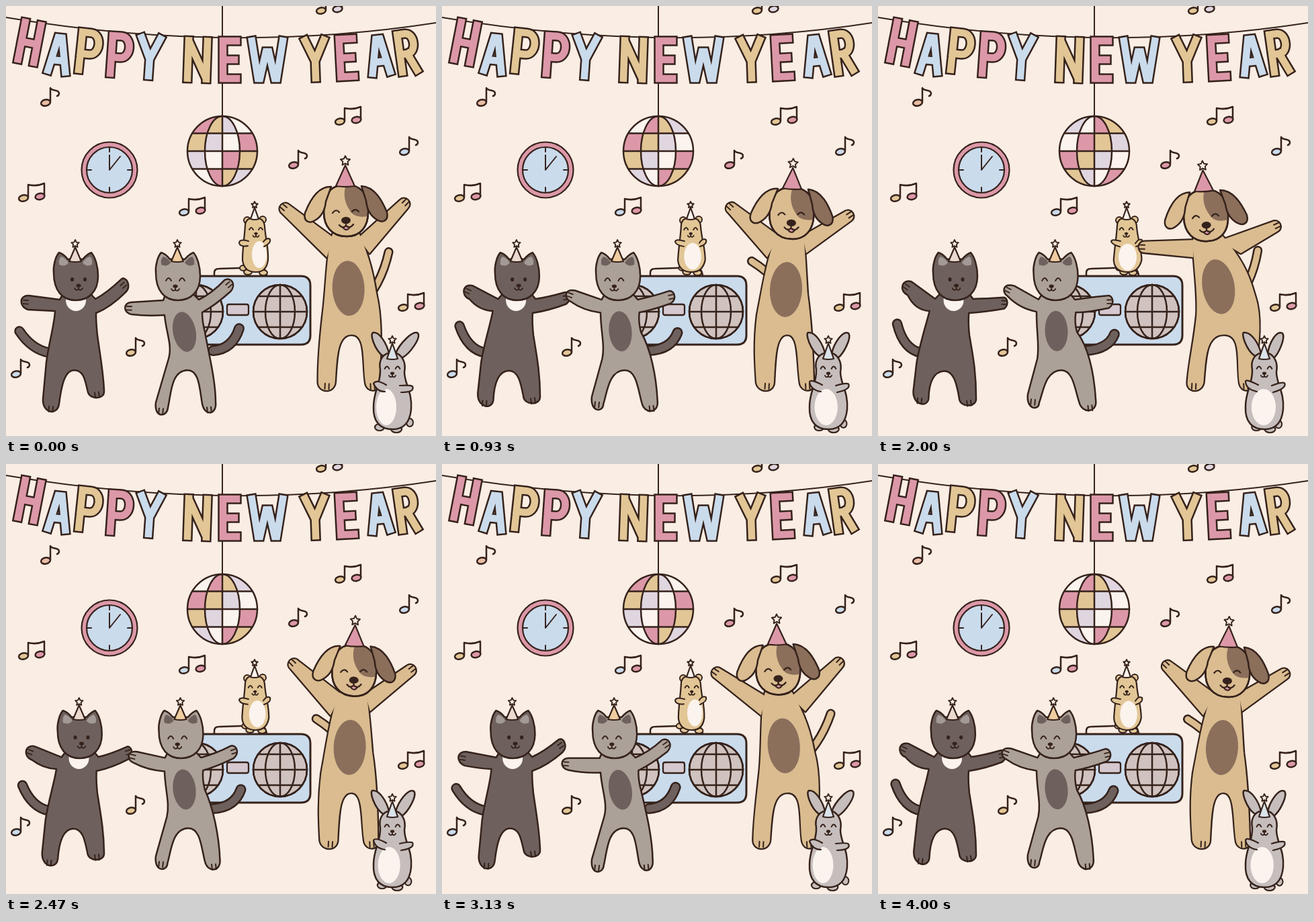
Recreate the animation shown at these times as an HTML page with a canvas. Size 640x640 px, loop 4.07 s.

```html
<!DOCTYPE html>
<html lang="en">
<head>
<meta charset="utf-8">
<title>Happy New Year</title>
<style>
html, body { margin: 0; width: 100%; height: 100%; overflow: hidden; background: #faede4; }
canvas { display: block; width: 640px; height: 640px; }
</style>
</head>
<body>
<canvas id="stage" width="640" height="640" role="img" aria-label="HAPPY NEW YEAR"></canvas>
<script>
const ctx = document.getElementById('stage').getContext('2d');
const INK = '#35221b', BG = '#faede4', PINK = '#dc98a8', BLUE = '#cadbec', TAN = '#e2c696',
  LILAC = '#dfd6e0', CREAM = '#fbf3ed', COCOA = '#6e615d', GREY = '#aca199',
  DOG = '#dabc90', PATCH = '#8b6f5b', BUNNY = '#c6bebd';
const TAU = Math.PI * 2;
let k = 0; // pose blend for every "a~b" pair

const lerp = (a, b, t = k) => a + (b - a) * t;
const mix = (d, t) => d.replace(/(-?[\d.]+)~(-?[\d.]+)/g, (_, a, b) => lerp(+a, +b, t).toFixed(2));

function shape(d, fill, width = 2.5, t = k) {
  const p = new Path2D(mix(d, t));
  if (fill) { ctx.fillStyle = fill; ctx.fill(p); }
  if (width) { ctx.lineWidth = width; ctx.strokeStyle = INK; ctx.stroke(p); }
}
function oval(x, y, rx, ry, fill, width = 2.5, turn = 0) {
  ctx.beginPath();
  ctx.ellipse(x, y, rx, ry, turn * Math.PI / 180, 0, TAU);
  if (fill) { ctx.fillStyle = fill; ctx.fill(); }
  if (width) { ctx.lineWidth = width; ctx.strokeStyle = INK; ctx.stroke(); }
}
function tube(d, fill, width, t = k) {
  const p = new Path2D(mix(d, t));
  for (const [c, w] of [[INK, width + 5], [fill, width]]) {
    ctx.strokeStyle = c; ctx.lineWidth = w; ctx.stroke(p);
  }
}
function at(x, y, turn, fn) {
  ctx.save(); ctx.translate(x, y); ctx.rotate(turn * Math.PI / 180); fn(); ctx.restore();
}
const claws = (x, y, turn, size = 1) => at(x, y, turn, () => {
  ctx.scale(size, size);
  shape('M-3 0V8M3 0V8', null, 2);
});
function hat(x, base, w, h, fill) {
  shape(`M${x} ${base - h}L${x + w} ${base}Q${x} ${base + 2} ${x - w} ${base}Z`, fill, 2.2);
  const r = w > 11 ? 7.5 : w > 7 ? 6 : 5, y = base - h - r + 1;
  let d = '';
  for (let i = 0; i < 10; i++) {
    const a = i * TAU / 10 - TAU / 4, q = i % 2 ? r * .5 : r;
    d += (i ? 'L' : 'M') + (x + q * Math.cos(a)).toFixed(2) + ' ' + (y + q * Math.sin(a)).toFixed(2);
  }
  shape(d + 'Z', BG, 1.9);
}

const glyphs = {
  H: 'M-12 -28V28M12 -28V28M-12 1H12',
  A: 'M-13 25L-3 -25H3L13 25M-8 9H8',
  P: 'M-13 28V-28H0C17 -28 17 4 0 4H-13',
  Y: 'M-14 -28L0 3L14 -28M0 3V28',
  N: 'M-14 28V-28M14 28V-28M-11 -22L11 22',
  E: 'M10 -28H-10V28H10M-10 0H7',
  W: 'M-23 -28L-14 28H-11L-2 -12H2L11 28H14L23 -28',
  R: 'M-11 28V-28H0C15 -28 15 2 0 2H-11M0 2L11 28'
};
const banner = [['H', 35, 54, 11], ['A', 78, 72, 6], ['P', 124, 68, 6], ['P', 170, 73, 4], ['Y', 214, 76, 4],
  ['N', 285, 80, 2], ['E', 333, 80, 0], ['W', 389, 80, 0],
  ['Y', 460, 79, -2], ['E', 507, 77, -3], ['A', 556, 74, -6], ['R', 597, 69, -8]];
const inks = [PINK, BLUE, TAN, PINK, BLUE, TAN, PINK, BLUE, TAN, PINK, BLUE, TAN];

function drawBanner() {
  shape('M322 0V164', null, 2);
  shape('M0 17Q330 73 640 25', null, 2);
  ctx.save();
  ctx.lineCap = 'square';
  ctx.lineJoin = 'miter';
  ctx.miterLimit = 2;
  banner.forEach(([ch, x, y, turn], i) => at(x, y, turn, () => tube(glyphs[ch], inks[i], 10.5)));
  ctx.restore();
}

const note = (x, y, fill) => at(x, y, 0, () => {
  shape('M7 -1V-22C9 -17 20 -20 20 -14Q20 -11 17 -10', null, 2.5);
  oval(0, 0, 7, 4.6, fill, 2.5, -12);
});
const pair = (x, y, left, right) => at(x, y, 0, () => {
  shape('M7 -1V-20Q19 -17 31 -22V-4', null, 2.5);
  oval(0, 0, 7, 4.6, left, 2.5, -10);
  oval(24.5, -2.5, 7, 4.6, right, 2.5, -10);
});
function drawNotes() {
  note(59, 144, '#e9bda4'); note(593, 217, BLUE); note(428, 237, PINK);
  note(186, 516, TAN); note(15, 548, BLUE);
  pair(26, 286, TAN, PINK); pair(265, 307, BLUE, PINK); pair(497, 172, TAN, PINK);
  pair(591, 449, TAN, PINK); pair(469, 7, TAN, LILAC);
}

function drawBall(shift) {
  const R = 52, rows = [-52, -26.5, 0, 26.5, 52], cols = [-52, -26, 0, 26, 52];
  const colors = [PINK, TAN, LILAC, CREAM];
  const edge = (x, y) => x * Math.sqrt(Math.max(0, 1 - y * y / R / R));
  at(322, 216, 0, () => {
    for (let r = 0; r < 4; r++) for (let c = 0; c < 4; c++) {
      ctx.beginPath();
      for (let i = 0; i < 18; i++) {
        const down = i < 9, y = lerp(rows[r], rows[r + 1], (down ? i : 17 - i) / 8);
        ctx.lineTo(edge(cols[down ? c : c + 1], y), y);
      }
      ctx.fillStyle = colors[(r + c + shift) % 4];
      ctx.fill();
    }
    globe(R, 26, 26.5);
  });
}
function globe(r, rx, lat) {
  const w = Math.sqrt(r * r - lat * lat);
  oval(0, 0, r, r); oval(0, 0, rx, r);
  shape(`M0 ${-r}V${r}M${-r} 0H${r}M${-w} ${-lat}H${w}M${-w} ${lat}H${w}`);
}

function drawClock() {
  oval(154, 244, 41.5, 41.5, PINK, 2.2);
  oval(154, 244, 34, 34, BLUE, 2.2);
  shape('M154 211V217M154 270V276M121 244H127M181 244H187M154 244V222M154 244L170 224', null, 2);
}

function drawRadio() {
  shape('M310 402V397Q310 391 317 391L378 389Q386 389 388 401', BG);
  shape('M262 402H439Q453 402 453 416V490Q453 504 439 504H262Q250 504 250 490V416Q250 402 262 402Z', BLUE, 3);
  for (const x of [283, 408]) at(x, 455, 0, () => { oval(0, 0, 40, 40, '#cfc2bf'); globe(40, 22, 23); });
  shape('M332 444H358Q361 444 361 447V457Q361 460 358 460H332Q329 460 329 457V447Q329 444 332 444Z', '#d5c8cf', 2.3);
}

function happyFace(x, y, gap, size) {
  at(x, y, 0, () => {
    for (const side of [-gap, gap])
      shape(`M${side - 4 * size} 1Q${side} ${-7 * size} ${side + 4 * size} 1`, null, 1.9);
    smile(size);
  });
}
function smile(s) {
  at(0, 9 * s, 0, () => {
    oval(0, 0, 3.6 * s, 2.6 * s, INK, 0);
    shape(`M${-6 * s} ${4 * s}Q${-3 * s} ${9 * s} 0 ${5 * s}Q${3 * s} ${9 * s} ${6 * s} ${4 * s}M0 0V${5 * s}`, null, 1.8);
  });
}

function drawHamster() {
  oval(lerp(353, 358), 390, 5, 4, TAN, 2);
  oval(lerp(360, 365), 396, 6, 4, TAN, 2);
  oval(lerp(383, 380), 397, 6, 4, TAN, 2);
  oval(359, 319, 5, 5, TAN, 2); oval(382, 318, 5, 5, TAN, 2);
  shape('M356 326Q357 315 370 315Q384 315 385 328C386 345 391~392 360 390~392 378Q388 396 372 396Q354~352 396 352~351 378C352 360 355 345 356 326Z', TAN, 2.2);
  oval(lerp(377, 372.5), lerp(370, 373), lerp(11, 13), 20, CREAM, 0);
  shape('M360 357~358Q349 359~356 347 353~351Q347 346 361 350', TAN, 2);
  shape('M383 351~353Q388 344~345 393 347~348Q395 353~355 384 358', TAN, 2);
  happyFace(lerp(372, 370), 332, 7, .75);
  hat(370, 317, 6, 17, CREAM);
}

function drawBunny() {
  oval(lerp(601, 597), lerp(620, 622), 5, 6, BUNNY, 2);
  oval(lerp(556, 562), 627, 7, 5, BUNNY, 2.2);
  oval(lerp(581, 583), 630, 8, 5, BUNNY, 2.2);
  shape('M561 521C549~548 512 540 487 547~545 486C556 485 567 503 570 517Z', BUNNY);
  shape('M580 517C586~583 502 606~595 482 613~604 487C618~609 494 601~597 518 589 524Z', BUNNY);
  shape('M557 541C554 526 562 516 575 516C589 516 596 530 593 545C593 562 605 575 603 600C601 622 590 630 575 630C557 630 546 619 547 596C547 573 558 562 557 541Z', BUNNY);
  oval(lerp(566, 572.5), 597, lerp(15, 17.5), 27, CREAM, 0);
  shape('M564 574Q552~548 574~571 547 562~559Q551~549 555 566 564', BUNNY, 2.2);
  shape('M586 565Q601 564~560 605 566~562Q609 575~570 588 575', BUNNY, 2.2);
  happyFace(575, 539, 8, .85);
  hat(575, 525, 8, 23, '#dbe3ea');
}

function catHead(x, fill, inner, hatFill, face, happy) {
  at(x, 402, 0, () => {
    shape('M-33 -5C-34 -16 -30 -30 -25 -35Q-18 -33 -12 -25Q0 -27 10 -25Q17 -33 23 -35C29 -28 33 -14 33 0C33 24 18 36 0 36C-20 36 -33 22 -33 -5Z', fill);
    shape('M-25 -17Q-26 -26 -22 -29Q-15 -27 -11 -20Q-16 -13 -25 -17Z', inner, 0);
    shape('M24 -17Q25 -26 21 -29Q14 -27 10 -20Q15 -13 24 -17Z', inner, 0);
    hat(-1, -22, 9, 21, hatFill);
    if (happy) happyFace(face, 6, 10, 1);
    else at(face, 5, 0, () => {
      oval(-9.5, 0, 2.6, 3, INK, 0); oval(9.5, 0, 2.6, 3, INK, 0); smile(1);
    });
  });
}
function drawBlackCat() {
  tube('M64 516Q38 511 20~27 484~475', COCOA, 10.5);
  shape('M88~97 422L80~84 437~436L34~47 431~414C20~33 430~410 18~28 447~428 33~42 452~434Q55 453 73~76 454C72~73 475~470 64~63 500 60~58 530L55~53 585~575C54~52 607~597 77~74 610~600 79~76 592~586C82~77 570~560 86~84 543~544 101~99 542~543C117~113 542~543 118~117 560 122~121 575~582C125~122 586~596 147 586~596 146 573~582C145~146 545 140~141 520 136 490Q134 472 134~135 457Q156~160 448~454 178~186 426~446C188~194 417~440 178~190 400~428 171~184 407~429Q150~160 427~434 133~140 436L120~129 422Z', COCOA);
  oval(lerp(104, 111), 438, 15, 16, CREAM, 0);
  claws(lerp(67, 63), lerp(596, 586), 4); claws(lerp(135, 135), lerp(575, 585), -8);
  claws(lerp(33, 43), lerp(441, 424), lerp(95, 120), .9);
  claws(lerp(172, 182), lerp(418, 437), lerp(-130, -95), .9);
  catHead(lerp(104, 113), COCOA, '#a39995', '#ead9ce', lerp(4, 2));
}
function drawGreyCat() {
  tube('M308 513Q337~342 511 347~351 480~487', COCOA, 11);
  shape('M240~247 422L234~238 438~437L186~200 441~421C174~183 442~417 174~182 457~432 187~192 459~437Q210 462~452 236 460~456C238~236 485 248~242 505 242~238 525L223 590~580C220 614~604 240 612~604 241~240 598~592C246 575 246~248 543 270~272 542C288~290 542 288~292 570 292~298 592~590C296~302 612~608 314~324 608~606 312~322 590~588C312~320 555~550 300~312 510 296 485Q292 470 292~294 456Q312 445~454 334~342 425~445C344~352 414~437 334~346 402~424 325~338 408~427Q306~318 428~432 287~292 437L272~279 422Z', GREY);
  oval(265.5, lerp(485, 484), 17, 30, COCOA, 0, lerp(-11, -4));
  claws(231, lerp(599, 588), 6); claws(lerp(302, 313), lerp(597, 595), -6);
  claws(lerp(187, 195), lerp(450, 429), lerp(92, 112), .9);
  claws(lerp(329, 339), lerp(417, 436), lerp(-130, -98), .9);
  catHead(lerp(256, 263), GREY, COCOA, '#f0cda0', lerp(-4, -6), true);
}

function dogArm(x, y, ax, ay, bx, by) {
  const turn = Math.atan2(y - (ay + by) / 2, x - (ax + bx) / 2);
  const nx = -Math.sin(turn) * 8, ny = Math.cos(turn) * 8, f = v => v.toFixed(2);
  const dx = Math.cos(turn) * 11, dy = Math.sin(turn) * 11;
  const out = x < ax ? 1 : -1;
  return { x, y, turn: turn * 180 / Math.PI - 90,
    d: `M${f(ax)} ${f(ay)}L${f(x + nx * out)} ${f(y + ny * out)}C${f(x + nx * out + dx)} ${f(y + ny * out + dy)} ` +
       `${f(x - nx * out + dx)} ${f(y - ny * out + dy)} ${f(x - nx * out)} ${f(y - ny * out)}L${f(bx)} ${f(by)}Z` };
}
function drawDog(phase) {
  const sway = -Math.sin(TAU * phase / 22.5), c = Math.cos(TAU * (phase - .2) / 11.25);
  const t = (sway + .79) / 1.49;
  const wag = -2 + 45 * Math.tanh(1.5 * Math.cos(TAU * (phase - 3.6) / 22.5));
  at(525, 450, wag, () => tube('M0 0Q14 -45 0 -95', DOG, 9));

  const torso = mix('M472~502 335C466~486 360 477~477 420 474~469 460C470~464 500 463~466 530 461~468 560C460~470 575 482~493 577 485~494 560C488~496 525 488~496 489 515~514 489C542~532 489 533~528 530 538~533 562C541~536 575 556~554 575 557~553 560C566~552 515 572~549 465 560~544 430C552~542 400 542~541 375 508~538 335Z', t);
  const left = dogArm(416 + 22 * sway, 323 - 21 * c - 27 * sway,
    lerp(472, 501, t), lerp(348, 342, t), lerp(470, 484, t), 374);
  const right = dogArm(597 + 11 * sway - 5 * c, 316 - 21 * c,
    lerp(510, 537, t), lerp(349, 342, t), lerp(540, 542, t), 368);
  const parts = [torso, left.d, right.d];
  parts.forEach(d => shape(d, null, 4.6));
  parts.forEach(d => shape(d, DOG, 0));
  for (const a of [left, right]) claws(a.x, a.y, a.turn);
  claws(lerp(471, 484, t), 562, 3); claws(lerp(547, 544, t), 562, -3);
  oval(lerp(507, 512, t), lerp(418, 422, t), 24, 41, PATCH, 0, lerp(-9, 3, t));

  at(506 + 20 * sway, 319 + 4.5 * (1 - c), 3.4 * sway, drawDogHead);
}
function drawDogHead() {
  const skull = 'M-33 -12C-33 -34 -27 -53 0 -53C26 -53 33 -35 33 -12C33 9 22 24 1 24C-21 24 -33 9 -33 -12Z';
  shape(skull, DOG);
  shape('M0 -52C26 -52 32 -34 32 -6C20 -4 10 -6 5 -16C-3 -28 -4 -42 0 -52Z', PATCH, 0);
  shape(skull);
  shape('M-22 -50C-42 -51 -54 -29 -61 -11C-64 3 -53 5 -46 0C-36 -6 -31 -17 -30 -28Z', DOG);
  shape('M23 -51C43 -50 54 -29 61 -12C64 2 53 4 46 -1C36 -7 31 -18 30 -29Z', PATCH);
  shape('M-20 -11Q-15 -18 -10 -12M9 -13Q14 -19 19 -13', null, 2.2);
  oval(0, 0, 7, 5.2, INK, 0);
  shape('M-10 7Q-5 13 0 8Q6 13 11 6M0 3V8', null, 2.3);
  shape('M-5 10Q1 18 6 10Q3 11 0 8Q-3 11 -5 10Z', PINK, 2);
  hat(-1, -51, 14, 31, PINK);
}

function draw(phase) {
  k = (1 - Math.cos(TAU * (phase + .12) / 11.25)) / 1.18;
  ctx.fillStyle = BG;
  ctx.fillRect(0, 0, 640, 640);
  ctx.lineJoin = ctx.lineCap = 'round';
  drawNotes();
  drawBanner();
  drawBall(Math.floor((phase + 4) / 5.625) % 4);
  drawClock();
  drawRadio();
  drawHamster();
  drawDog(phase);
  drawBlackCat();
  drawGreyCat();
  drawBunny();
}

let shown = -1;
function tick() {
  const step = Math.min(60, Math.floor((performance.now() % 4070 + 3.4) * 15 / 1000));
  if (step !== shown) {
    shown = step;
    draw(step < 36 ? step : step - 1); // one held step per loop
  }
  requestAnimationFrame(tick);
}
tick();
</script>
</body>
</html>
```
